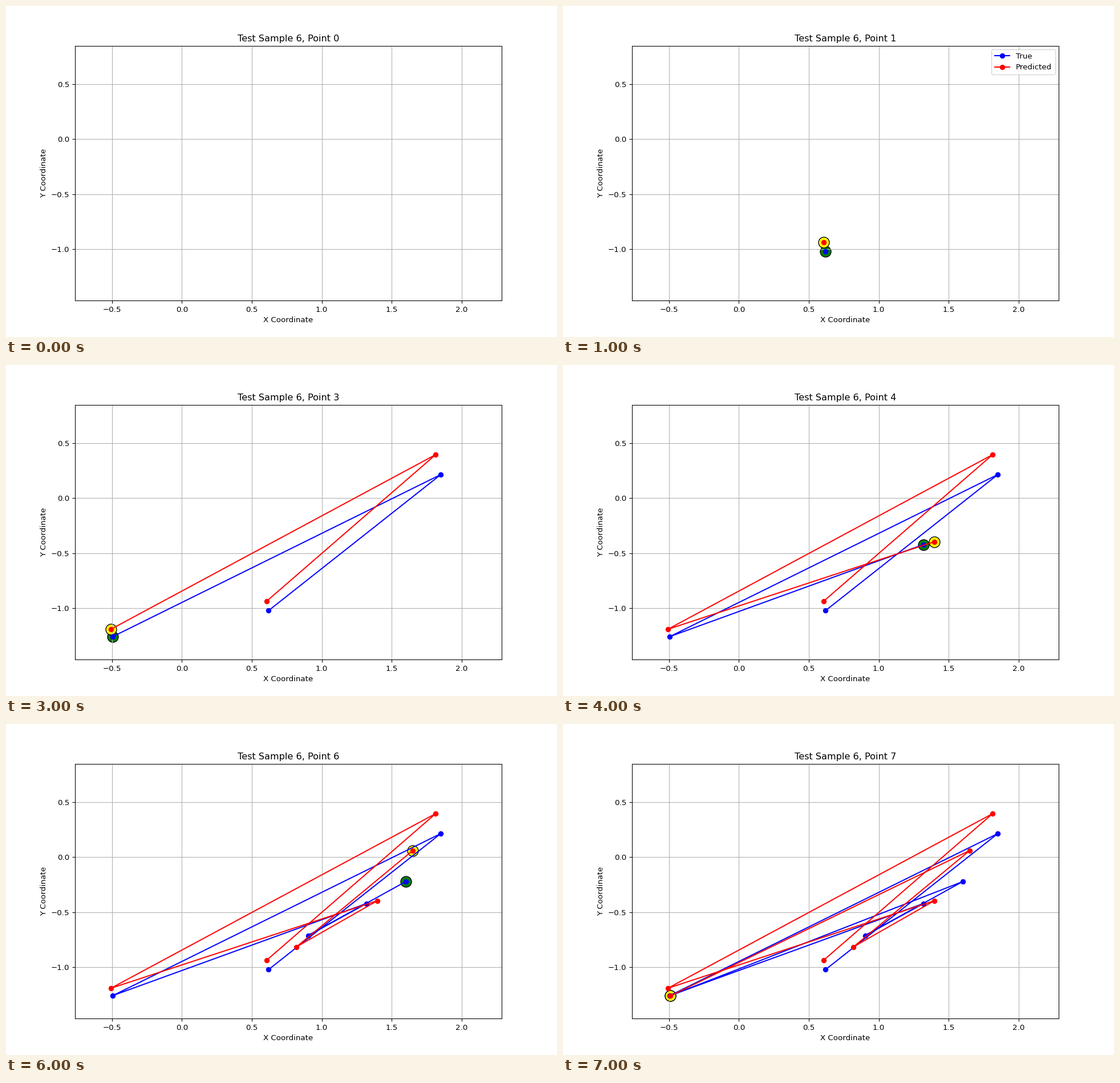
Write a matplotlib script that moves like this. It is 966 px wide and 580 px high and loops after 8000 ms.

```python
import matplotlib.pyplot as plt
from matplotlib.animation import FuncAnimation

WIDTH, HEIGHT, DPI = 966, 580, 96.6
NUDGE = 1e-3  # keeps the pixel size from rounding down

# Key points the two paths visit, one per second
TRUE_PATH = [(0.619, -1.022), (1.852, 0.215), (-0.493, -1.257), (1.320, -0.421),
             (0.902, -0.712), (1.600, -0.222), (-0.492, -1.259)]
PRED_PATH = [(0.607, -0.935), (1.815, 0.396), (-0.508, -1.191), (1.399, -0.395),
             (0.819, -0.815), (1.651, 0.061), (-0.490, -1.260)]

plt.rcParams["font.family"] = "DejaVu Sans"
fig, ax = plt.subplots(figsize=((WIDTH + NUDGE) / DPI, (HEIGHT + NUDGE) / DPI), dpi=DPI)


def add_path(points, style, label, halo_color):
    line, = ax.plot([], [], style, label=label)
    halo = ax.scatter([], [], s=200, color=halo_color, edgecolor="black")
    return points, line, halo


paths = [
    add_path(TRUE_PATH, "bo-", "True", "green"),
    add_path(PRED_PATH, "ro-", "Predicted", "yellow"),
]

ax.set_xlim(-0.765, 2.288)
ax.set_ylim(-1.4665, 0.849)
ax.set_xlabel("X Coordinate")
ax.set_ylabel("Y Coordinate")
ax.grid(True)
legend = ax.legend(loc="upper right")


def draw(count):
    """Show the first `count` points of both paths, the newest one ringed."""
    for points, line, halo in paths:
        shown = points[:count]
        line.set_data([x for x, _ in shown], [y for _, y in shown])
        halo.set_offsets(shown[-1:] or [(float("nan"),) * 2])
    legend.set_visible(count == 1)
    ax.set_title(f"Test Sample 6, Point {count}")


anim = FuncAnimation(fig, draw, frames=len(TRUE_PATH) + 1, init_func=lambda: draw(0),
                     interval=1000, repeat=True, repeat_delay=0)
plt.show()
```
